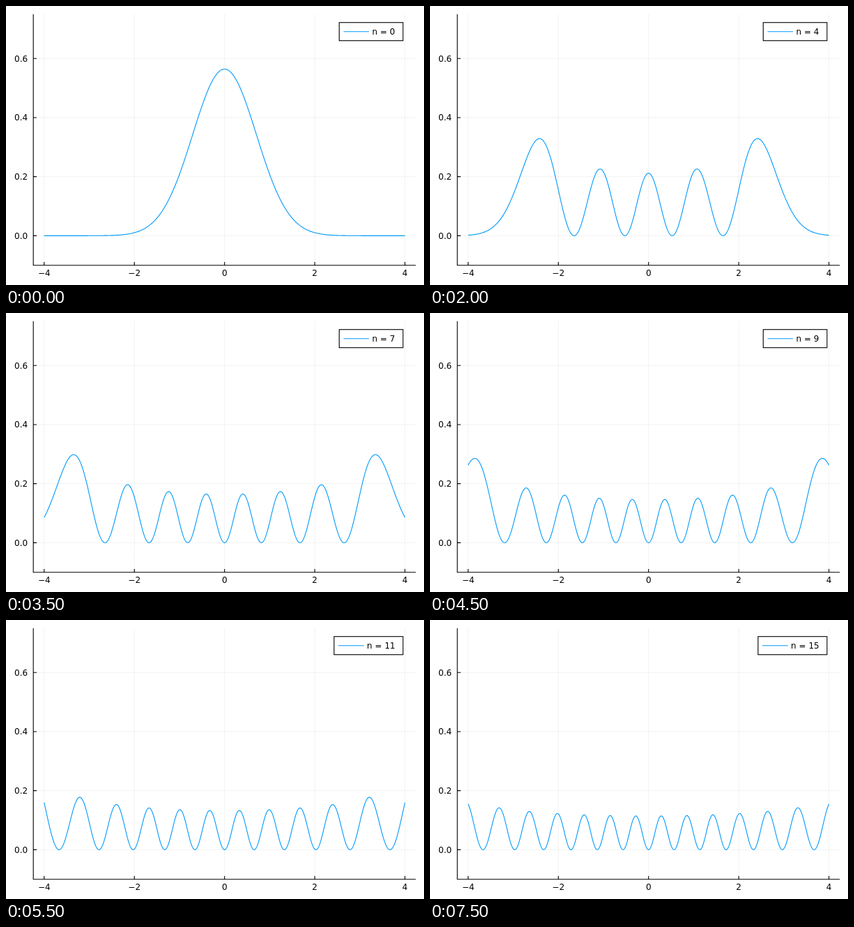
These frames come from a looping animation (600x400 px, 8 s). An HTML page:

```html
<!DOCTYPE html>
<html>
<head>
<meta charset="utf-8">
<style>
html, body { margin: 0; width: 100%; height: 100%; overflow: hidden; background: #fff; }
svg { display: block; }
text { font: 12px "DejaVu Sans", sans-serif; }
path, rect { fill: none; stroke: #000; stroke-width: 1.1; }
#grid { stroke-opacity: .1; stroke-width: .55; }
#curve, #key { stroke: #009af9; stroke-linejoin: round; }
#box { fill: #fff; }
</style>
</head>
<body>
<svg width="600" height="400" viewBox="0 0 600 400">
  <path id="grid"/>
  <path id="axes"/>
  <g id="labels"></g>
  <path id="curve"/>
  <rect id="box" y="23.7" height="26"/>
  <path id="key"/>
  <text id="name" y="41.2"></text>
</svg>
<script>
const LEFT = 39.2, RIGHT = 588.2, TOP = 11.8, BOTTOM = 371.7;
const STEP = 500, STATES = 16;
const el = id => document.getElementById(id);
const px = x => 313.7 + x * 64.74;
const py = y => 329.35 - y * 423.4;

// Probability density of the n-th harmonic oscillator state
function density(n, x) {
  let prev = 0, psi = Math.PI ** -0.25 * Math.exp(-x * x / 2);
  for (let k = 1; k <= n; k++) {
    [prev, psi] = [psi, Math.sqrt(2 / k) * x * psi - Math.sqrt((k - 1) / k) * prev];
  }
  return psi * psi;
}

function drawAxes() {
  let grid = "", axes = `M${LEFT} ${TOP}V${BOTTOM}H${RIGHT}`, labels = "";
  for (const x of [-4, -2, 0, 2, 4]) {
    grid += `M${px(x)} ${TOP}V${BOTTOM}`;
    axes += `M${px(x)} ${BOTTOM}v-4.8`;
    labels += `<text x="${px(x)}" y="387" text-anchor="middle">${String(x).replace("-", "\u2212")}</text>`;
  }
  for (const y of [0, 0.2, 0.4, 0.6]) {
    grid += `M${LEFT} ${py(y)}H${RIGHT}`;
    axes += `M${LEFT} ${py(y)}h4.8`;
    labels += `<text x="31.2" y="${py(y) + 4.4}" text-anchor="end">${y.toFixed(1)}</text>`;
  }
  el("grid").setAttribute("d", grid);
  el("axes").setAttribute("d", axes);
  el("labels").innerHTML = labels;
}

function drawState(n) {
  const points = [];
  for (let i = 0; i <= 800; i++) {
    const x = i / 100 - 4;
    points.push(px(x).toFixed(2) + " " + py(density(n, x)).toFixed(2));
  }
  el("curve").setAttribute("d", "M" + points.join("L"));

  const left = n < 10 ? 478.3 : 470.9;
  el("box").setAttribute("x", left);
  el("box").setAttribute("width", 569.9 - left);
  el("key").setAttribute("d", `M${left + 6.2} 36.8h36.6`);
  el("name").setAttribute("x", left + 47.2);
  el("name").textContent = "n = " + n;
}

let shown = -1;
const start = performance.now();
function tick() {
  const n = Math.floor((performance.now() - start) / STEP) % STATES;
  if (n !== shown) drawState(shown = n);
  requestAnimationFrame(tick);
}
drawAxes();
tick();
</script>
</body>
</html>
```
